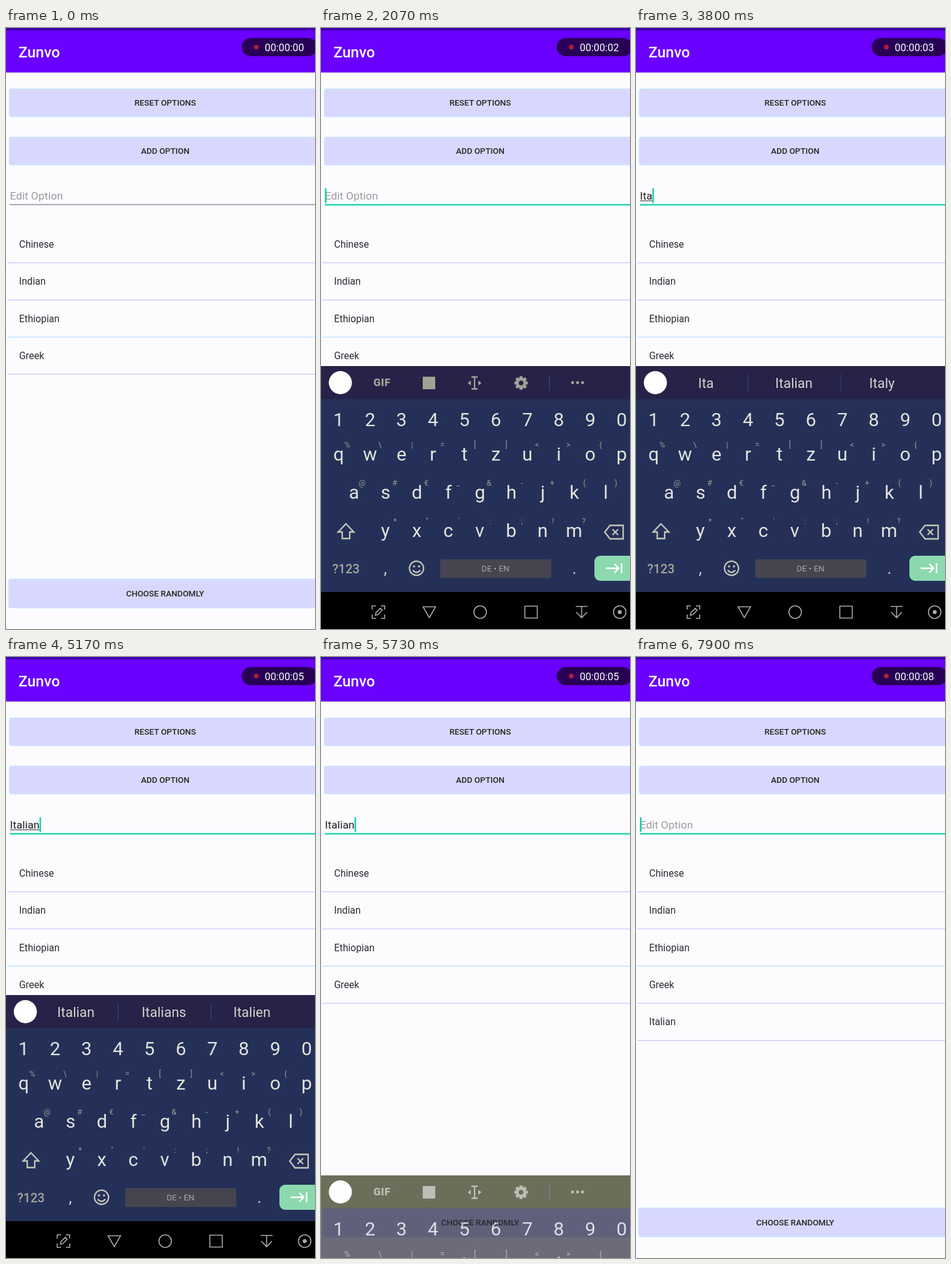
Write an HTML page that moves like this. It is 495 px wide and 960 px high and loops after 8000 ms.

```html
<!DOCTYPE html>
<html lang="en">
<head>
<meta charset="utf-8">
<title>Random chooser</title>
<style>
  html, body { margin: 0; width: 100%; height: 100%; overflow: hidden; background: #fcfcff; }
  svg { display: block; width: 100vw; height: 100vh; font-family: Roboto, "Noto Sans", sans-serif; }
  text { white-space: pre; }
  .mid { text-anchor: middle; }
  .end { text-anchor: end; }
  .line { fill: none; stroke-width: 2.3; }
  .thin .line { stroke-width: 1.6; }
</style>
</head>
<body>
<svg id="stage" viewBox="0 0 495 960"></svg>
<script>
const LOOP = 8000, STEP = 100 / 3;
const FOCUS = 1700, ADDED = 6630;
const OPEN = [1900, 2050], CLOSE = [5633, 5753];
const WORD = "Italian";
const KEYS = [2800, 3150, 3480, 3820, 4170, 4520, 4870];
const BLINK_STARTS = [FOCUS, ...KEYS, 5370, ADDED];
const HINTS = [
  "I Ich Is", "It Its Ist", "Ita Italian Italy", "Ital Italian Italien",
  "Itali Italian Italien", "Italia Italian Italien", "Italian Italians Italien"
].map(s => s.split(" "));

const text = (x, y, size, fill, str, extra = "") =>
  `<text x="${x}" y="${y}" font-size="${size}" fill="${fill}" ${extra}>${str.replace(/&/g, "&amp;").replace(/</g, "&lt;")}</text>`;
const mid = (x, y, size, fill, str, extra = "") => text(x, y, size, fill, str, 'class="mid" ' + extra);
const rect = (x, y, w, h, fill, extra = "") =>
  `<rect x="${x}" y="${y}" width="${w}" height="${h}" fill="${fill}" ${extra}/>`;
const circle = (x, y, r, fill, extra = "") => `<circle cx="${x}" cy="${y}" r="${r}" fill="${fill}" ${extra}/>`;
const path = (d, stroke) => `<path class="line" d="${d}" stroke="${stroke}"/>`;

const button = (x, y, h, label) =>
  rect(x, y, 505 - x, h, "#d8d8ff", 'rx="3.5" stroke="#c6eeff"') +
  mid(255, y + h / 2 + 4.9, 13.3, "#262620", label, 'font-weight="500"');

const item = (name, i) =>
  text(21, 350.7 + 59.4 * i, 15.6, "#2c2c30", name) +
  rect(2, 374.2 + 59.4 * i, 500, 1.5, i == 2 ? "#c0e4ff" : "#d2ceff");

const keyRow = (x, y, keys, marks = "") => [...keys].map((key, i) => {
  const cx = x + 50.4 * i;
  return mid(cx, y, 30, "#e2e4dc", key) +
    (marks[i] ? text(cx + 18.5, y - 21, 12.5, "#9c9e8c", marks[i], 'class="end"') : "");
}).join("");

function gear(x, y) {
  let teeth = "";
  for (let a = 0; a < 360; a += 45)
    teeth += rect(x - 2.6, y - 10.8, 5.2, 6, "#a2a296", `rx="1" transform="rotate(${a} ${x} ${y})"`);
  return teeth + circle(x, y, 6, "none", 'stroke="#a2a296" stroke-width="4.4"');
}

const toolbar =
  mid(97.8, 572.3, 17, "#a2a296", "GIF", 'font-weight="900" letter-spacing="0.6"') +
  rect(163, 557, 20, 20, "#a2a296") +
  path("M241 557.5H251M241 576.5H251M246 558V576", "#a2a296") +
  `<path d="M240 563v8l-5-4zM252 563v8l5-4z" fill="#a2a296"/>` +
  gear(320.5, 567) +
  rect(365, 554, 1.5, 25, "#40406c") +
  [403, 411, 419].map(x => circle(x, 566.5, 2.4, "#a2a296")).join("");

const nav =
  rect(0, 901, 495, 59, "#000") +
  `<g class="thin" stroke-width="1.6">` + [
    "M82 929V923H88M96 923H102V929M102 937V943H96M88 943H82V937M87 938L88 934L95 927L98 930L91 937Z",
    "M163.5 924.5H183.5L173.5 942Z",
    "M326.5 923.5H346.5V942.5H326.5Z",
    "M408 924H427M417.5 924V941M409 933L417.5 942L426 933"
  ].map(d => path(d, "#aaa")).join("") +
  circle(255, 933, 10, "none", 'stroke="#aaa"') +
  circle(478.5, 933, 10, "none", 'stroke="#aaa"') + circle(478.5, 933, 3.2, "#aaa") + `</g>`;

const keyboard =
  rect(0, 540, 495, 53, "", 'id="barBack"') +
  rect(0, 593, 495, 308, "", 'id="keyBack"') +
  circle(31, 566.5, 18.5, "#fff") +
  `<g id="tools">${toolbar}</g><g id="hints">` +
  [112, 253, 394].map(x => mid(x, 575, 22, "#d2d4cc", "")).join("") +
  rect(179, 553, 1.2, 28, "#40406c") + rect(328, 553, 1.2, 28, "#40406c") + `</g>` +
  keyRow(28.2, 635.5, "1234567890") +
  keyRow(28.2, 691, "qwertzuiop", "%\\|=[]<>{") +
  keyRow(53, 752, "asdfghjkl", "@#€_&-+()") +
  keyRow(103, 812.5, "yxcvbnm", "*\"':;!?") +
  path("M40 792L52.5 805H46V815.5H34V805H27.5Z", "#c4c6b8") +
  path("M463 794.5H484V816H463L454.5 805.2ZM467 800.7L476 809.7M476 800.7L467 809.7", "#c4c6b8") +
  mid(40, 870.5, 20, "#a6a898", "?123", 'font-weight="500"') +
  mid(103, 872, 26, "#d0d2c8", ",") + mid(406, 872, 26, "#d0d2c8", ".") +
  circle(153, 863, 11.3, "none", 'stroke="#c4c6b8" stroke-width="2.2"') +
  circle(149, 860, 1.8, "#c4c6b8") + circle(157, 860, 1.8, "#c4c6b8") +
  path("M147 866Q153 873 159 866", "#c4c6b8") +
  rect(191, 848.5, 178, 30, "#454550", 'rx="3"') +
  mid(279.5, 868, 13.3, "#a8a8a8", "DE • EN") +
  rect(438, 843, 70, 40, "#8cd9ae", 'rx="9"') +
  path("M456 863H477M470 856L477 863L470 870M481.5 855V871", "#fff") + nav;

const stage = document.getElementById("stage");
stage.innerHTML =
  rect(0, 0, 495, 960, "#fcfcff") +
  rect(0, 71, 495, 1.5, "#e2e0ea") +
  rect(0, 0, 495, 71, "#6a00ff") + rect(0, 0, 495, 4, "#4000b0") +
  text(20, 47, 24, "#fff", "Zunvo", 'font-weight="500"') +
  rect(377.5, 16, 121, 29, "#280056", 'rx="14.5"') + circle(401, 30.5, 3.8, "#a8203c") +
  text(414.5, 36.8, 16.3, "#fff", "", 'id="clock"') +
  button(5, 97, 45, "RESET OPTIONS") + button(5, 174, 45, "ADD OPTION") + button(4, 880, 46.5, "CHOOSE RANDOMLY") +
  rect(5, 174, 500, 45, "#000", 'id="press" rx="3.5"') +
  text(6.3, 274, 17.4, "#9a9a9e", "Edit Option", 'id="prompt"') +
  text(6.3, 274, 17.4, "#202024", "", 'id="entry"') +
  rect(6.5, 275.5, 0, 1, "#202024", 'id="mark"') +
  rect(6, 281.5, 500, 1.2, "#7c7084", 'id="idle"') +
  rect(6, 281.2, 500, 2.4, "#1fd3b0", 'id="active"') +
  rect(6, 256, 2.6, 23.5, "#1fcfae", 'id="caret"') +
  ["Chinese", "Indian", "Ethiopian", "Greek"].map(item).join("") +
  `<g id="added">${item(WORD, 4)}</g><g id="board">${keyboard}</g>`;

const $ = id => document.getElementById(id);
const show = (id, on) => $(id).setAttribute("visibility", on ? "visible" : "hidden");
const ramp = (t, [a, b]) => Math.min(1, Math.max(0, (t - a) / (b - a)));
const hintTexts = $("hints").querySelectorAll("text");

function draw(t) {
  $("clock").textContent = "00:00:0" + Math.floor((t + 40) / 985);

  const count = t < ADDED ? KEYS.filter(k => k <= t).length : 0;
  const composing = count > 0 && t < CLOSE[0];
  $("entry").textContent = WORD.slice(0, count);
  const width = count ? $("entry").getComputedTextLength() : 0;
  $("mark").setAttribute("width", composing ? width : 0);
  show("prompt", !count);

  const focused = t >= FOCUS;
  show("idle", !focused);
  show("active", focused);
  const since = t - Math.max(...BLINK_STARTS.filter(s => s <= t));
  show("caret", focused && since % 1000 < 500);
  $("caret").setAttribute("x", 6.2 + width);

  show("added", t >= ADDED);
  const press = ramp(t, [6600, 6700]) * (1 - ramp(t, [6850, 7230]));
  $("press").setAttribute("opacity", press * 0.1);

  // 0 = keyboard fully up, 1 = fully down
  const closing = t >= CLOSE[0];
  const down = closing ? ramp(t, CLOSE) ** 2 : (1 - ramp(t, OPEN)) ** 2;
  $("board").setAttribute("transform", `translate(0 ${412 * down})`);
  $("board").setAttribute("opacity", 1 - 0.46 * down);
  $("board").style.display = down < 1 ? "" : "none";
  $("barBack").setAttribute("fill", closing ? "#2a2c0c" : "#262248");
  $("keyBack").setAttribute("fill", closing ? "#28283c" : "#243058");
  $("tools").style.display = composing ? "none" : "";
  $("hints").style.display = composing ? "" : "none";
  if (composing) hintTexts.forEach((el, i) => el.textContent = HINTS[count - 1][i]);
}

function tick(now) {
  draw(Math.floor((now % LOOP + 4) / STEP) * STEP % LOOP);
  requestAnimationFrame(tick);
}
draw(0);
requestAnimationFrame(tick);
</script>
</body>
</html>
```
